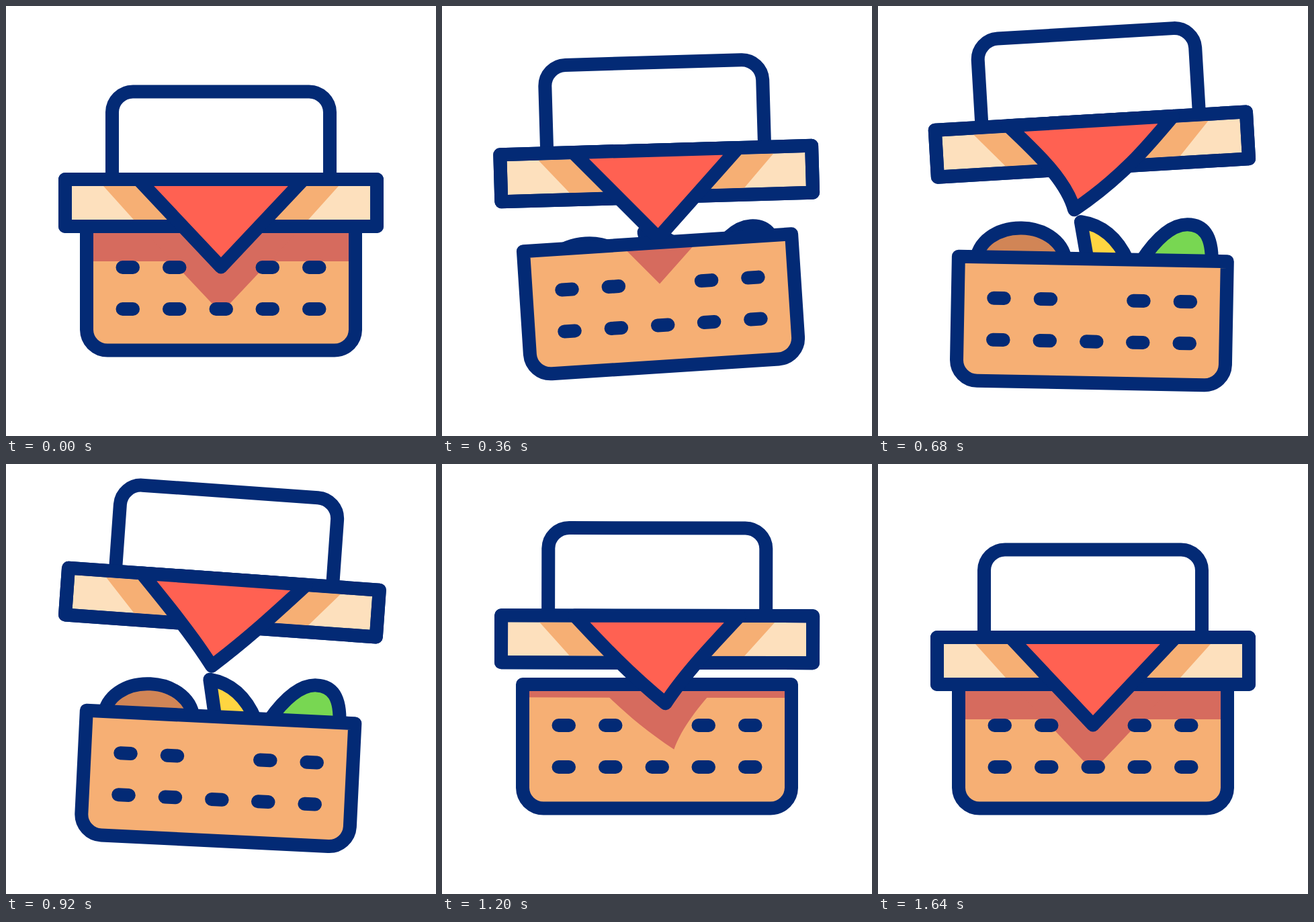
These frames come from a looping animation (640x640 px, 1880 ms). An HTML page:

```html
<!DOCTYPE html>
<html lang="en">
<head>
<meta charset="utf-8">
<title>Picnic basket</title>
<style>
  html, body { margin: 0; height: 100%; overflow: hidden; background: #fff; }
  svg { display: block; width: 100%; height: 100%; }
</style>
</head>
<body>
<svg viewBox="0 0 640 640">
  <defs>
    <path id="body" d="M120 328V482A31 31 0 0 0 151 512.500H489A31 31 0 0 0 520 482V328Z"/>
    <clipPath id="inside"><use href="#body"/></clipPath>
  </defs>
  <g stroke="#032a75" stroke-width="20" stroke-linecap="round" stroke-linejoin="round" fill="none">
    <g id="basket">
      <g id="food">
        <path fill="#d18556" d="M147 334A66 50 0 0 1 279 334Z"/>
        <path fill="#ffd541" d="M301 273Q348 279 372 330H312Z"/>
        <path fill="#78d752" d="M392 330C412 298 436 274 460 274C484 274 497 290 497 330Z"/>
      </g>
      <use href="#body" fill="#f6af74" stroke="none"/>
      <g clip-path="url(#inside)" fill="#d66b5e" stroke="none">
        <g id="shade">
          <path d="M40 200H600V380H40Z"/>
          <path id="clothShade"/>
        </g>
      </g>
      <use href="#body"/>
      <path d="M173.500 389h15.500m54 0h15.500m123 0h15.500m54 0h15.500M173.500 451h15.500m54 0h15.500m54 0h15.500m53.500 0h15.500m54 0h15.500"/>
    </g>
    <g id="lid">
      <path d="M158 258V158A31 31 0 0 1 189 127.500H451A31 31 0 0 1 482 158V258"/>
      <path fill="#fde0bd" d="M88 258H552V328H88Z"/>
      <path fill="#f6af74" stroke="none" d="M145 268H495L450 318H190Z"/>
      <path d="M88 258H552V328H88Z"/>
      <path id="cloth" fill="#ff6152"/>
    </g>
  </g>
</svg>
<script>
const TICK = 40, LOOP = 1880;
const $ = id => document.getElementById(id);

// Each track is a list of [tick, value] keys, eased with a cosine.
const tracks = {
  open: [[6, 0], [12, 1], [24, 1], [30, 0]],
  bodyTilt: [[0, 0], [8, -3.8], [22, 3], [28, 0]],
  lift: [[3, 0], [15, -87], [23, -87], [35, 0]],
  lidTilt: [[5.7, 0], [15, -6], [21, 4.5], [31, 0]],
  swing: [[9, 0], [18, -33], [28, 15], [37, -4], [41, 0]]
};

function valueAt(keys, tick) {
  const next = keys.findIndex(key => key[0] > tick);
  if (next === 0) return keys[0][1];
  if (next < 0) return keys[keys.length - 1][1];
  const [t0, v0] = keys[next - 1], [t1, v1] = keys[next];
  return v0 + (v1 - v0) * (1 - Math.cos(Math.PI * (tick - t0) / (t1 - t0))) / 2;
}

// Triangle whose tip swings sideways while its upper part stays put.
function clothPath(top, swing) {
  const a = top + 43.5, b = top + 87, tip = top + 130.5;
  return `M197 ${top}C238 ${a} 279 ${b} ${320 + swing} ${tip}C361 ${b} 402 ${a} 443 ${top}Z`;
}

const move = (id, value) => $(id).setAttribute("transform", value);

function draw(now) {
  const tick = Math.floor(now % LOOP / TICK);
  const { open, bodyTilt, lift, lidTilt, swing } = Object.fromEntries(
    Object.entries(tracks).map(([name, keys]) => [name, valueAt(keys, tick)]));
  const drop = 48.5 * open;
  const lid = `translate(0 ${lift}) rotate(${lidTilt} 320 320)`;
  move("basket", `translate(0 ${drop}) rotate(${bodyTilt} 320 320)`);
  move("food", `translate(0 ${76.5 * (1 - open)})`);
  move("lid", lid);
  // Cancel the basket's motion so the shadow follows the lid.
  move("shade", `rotate(${-bodyTilt} 320 320) translate(0 ${-drop}) ${lid}`);
  $("cloth").setAttribute("d", clothPath(258, swing));
  $("clothShade").setAttribute("d", clothPath(326.5, swing * 2));
}

const start = performance.now();
function loop() {
  draw(performance.now() - start);
  requestAnimationFrame(loop);
}
loop();
</script>
</body>
</html>
```
